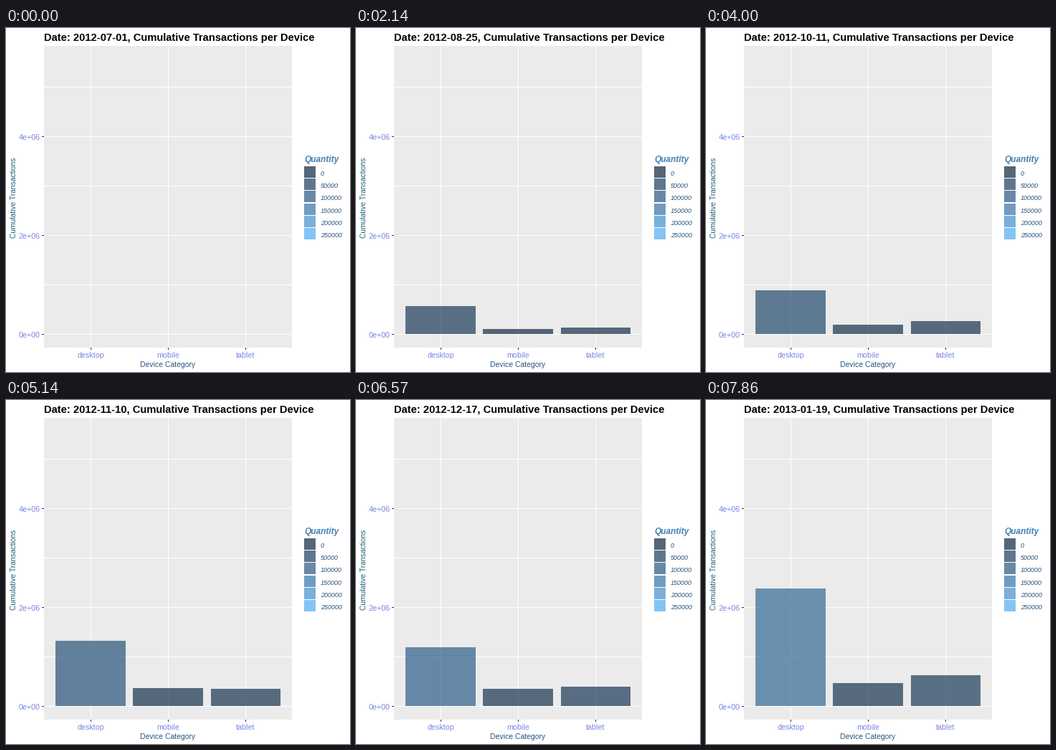
Write a matplotlib script that moves like this. It is 480 by 480 pixels and loops after 8 s.

```python
import matplotlib.pyplot as plt
import numpy as np
from matplotlib.animation import FuncAnimation
from matplotlib.colors import LinearSegmentedColormap
from matplotlib.patches import Rectangle

SIZE, DPI = 480, 100
LOOP, TICK = 8000, 40          # ms
STEPS = 56                     # data steps in one loop
DAYS_PER_STEP = 364 / 99
START = np.datetime64("2012-07-01")

LEFT, RIGHT, TOP, BOTTOM = 53, 399, 25, 446
BASE = 427                     # pixel row of the zero line
CENTERS = (118, 226, 334)
BARS = ((69, 167), (177, 275), (286, 383))
ALPHA = 0.7

BLUES = LinearSegmentedColormap.from_list(
    "blues", ["#132B43", "#23496C", "#336A98", "#448DC7", "#56B1F7"])
AXIS_TEXT, NAVY, TEAL, STEEL = "#7B86E6", "#27547F", "#1F6078", "#4682B4"

plt.rcParams["font.family"] = "Liberation Sans"
fig = plt.figure(figsize=(SIZE / DPI, SIZE / DPI), dpi=DPI, facecolor="white")
ax = fig.add_axes([0, 0, 1, 1])
ax.set_xlim(0, SIZE)
ax.set_ylim(SIZE, 0)
ax.axis("off")


def box(x, y, w, h, color, alpha=1, z=1):
    return ax.add_patch(Rectangle((x, y), w, h, facecolor=color, alpha=alpha,
                                  linewidth=0, antialiased=False, zorder=z))


def label(x, y, text, px, color, ha="left", **style):
    return ax.text(x, y, text, fontsize=px * 72 / DPI, color=color, ha=ha,
                   va="baseline", rotation_mode="anchor", zorder=5, **style)


# panel, grid and axes
box(LEFT, TOP, RIGHT - LEFT, BOTTOM - TOP, "#EBEBEB")
for y in range(BASE, TOP, -69):
    box(LEFT, y, RIGHT - LEFT, 1, "white")
for x, name in zip(CENTERS, ("desktop", "mobile", "tablet")):
    box(x, TOP, 1, BOTTOM - TOP, "white")
    box(x, BOTTOM, 1, 3, "#333333")
    label(x, 460, name, 10.6, AXIS_TEXT, "center")
for i, name in enumerate(("0e+00", "2e+06", "4e+06")):
    y = BASE - 138 * i
    box(LEFT - 3, y, 3, 1, "#333333")
    label(48, y + 4.5, name, 10.8, AXIS_TEXT, "right")
label(226, 473, "Device Category", 10.4, NAVY, "center")
label(14, 236.5, "Cumulative Transactions", 10.3, TEAL, "center", rotation=90)

# legend
label(416, 187, "Quantity", 11.9, STEEL, weight="bold", style="italic")
for i in range(6):
    y = round(193 + 17.2 * i)
    box(416, y, 16, 16, "#F2F2F2")
    box(416, y, 16, 16, BLUES(i / 5), ALPHA, 2)
    label(439, 206 + 17.2 * i, str(50000 * i), 9, NAVY, style="italic")

title = label(53, 18, "", 14.8, "black", weight="bold")
bars = [box(x0, BASE, x1 - x0, 0, "black", ALPHA, 3) for x0, x1 in BARS]

# bar heights in pixels: a rising level with day-to-day wobble between anchors
anchors = [0, 9, 20, 28, 36, 46, 55]
levels = [[0, 19.5, 48.5, 60.5, 90.5, 81.5, 163.5],
          [0, 4.5, 14.5, 12.5, 24.5, 23.5, 31.5],
          [0, 4.5, 11.5, 17.5, 23.5, 26.5, 42.5]]
wobble = np.random.default_rng(7).normal(0, 0.13, (3, STEPS))
wobble[:, anchors] = 0
steps = np.arange(STEPS)
heights = np.array([np.interp(steps, anchors, row) for row in levels])
heights *= 1 + np.clip(wobble, -0.25, 0.25)

# share of the colour scale reached by each device at the end
SHADES = (0.5, 0.08, 0.13)


def draw(i):
    k = min(int((i * TICK + 30) * 7 / 1000), STEPS - 1)
    day = START + int(k * DAYS_PER_STEP)
    title.set_text(f"Date: {day}, Cumulative Transactions per Device")
    for bar, height, shade in zip(bars, heights[:, k], SHADES):
        h = int(height + 0.5)
        bar.set_y(BASE - h)
        bar.set_height(h)
        bar.set_facecolor(BLUES(shade * k / (STEPS - 1)))
    return [title, *bars]


anim = FuncAnimation(fig, draw, frames=LOOP // TICK, interval=TICK,
                     init_func=lambda: draw(0), repeat=True, repeat_delay=0)
plt.show()
```
